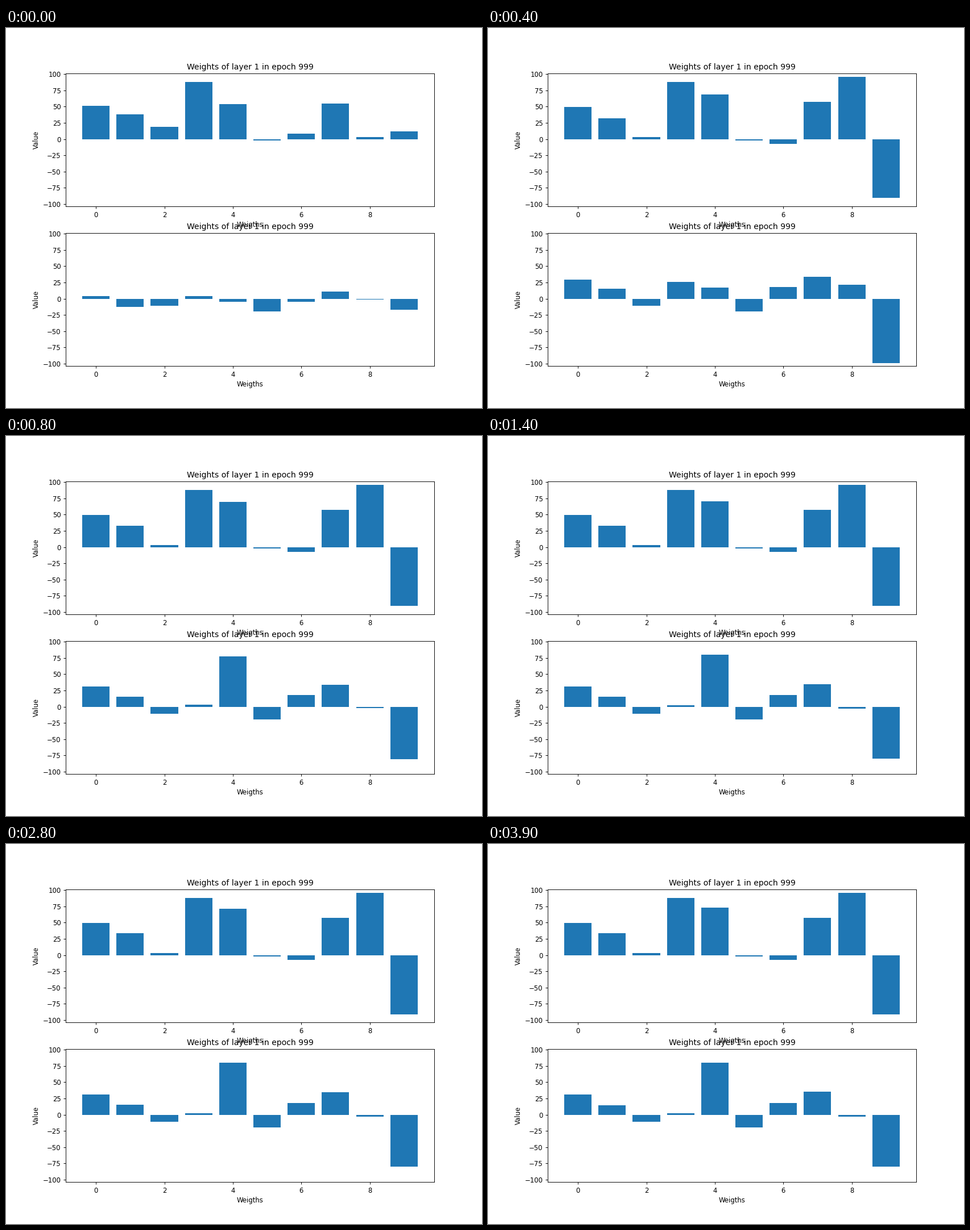
A matplotlib script for the animation above (5 s loop, 837 by 669 pixels).

```python
import numpy as np
import matplotlib.pyplot as plt
from matplotlib.animation import FuncAnimation

W, H, DPI = 837, 669, 83.7
TICKS, STEP_MS = 50, 100
BARS = 10


def weights(top, low):
    """Two layers of weights; bars left out are zero."""
    layers = np.zeros((2, BARS))
    for layer, values in zip(layers, (top, low)):
        for bar, value in values.items():
            layer[bar] = value
    return layers


def ramp(t, begin, end):
    return np.clip((t - begin) / (end - begin), 0, 1)


def settling(t):
    """Fast rise after tick 5 that levels off."""
    return 1 - np.exp(-0.5 * max(t - 5, 0) ** 1.7)


START = np.array([
    [51.2, 38.0, 18.8, 88.3, 53.9, -2.0, 8.2, 54.7, 2.9, 12.3],
    [3.7, -12.4, -10.8, 3.7, -5.1, -19.8, -4.4, 11.3, -1.2, -17.4],
])
lift = dict.fromkeys((3, 4, 6, 7, 8), 22.6)

# Each phase adds its weight changes, scaled by its progress over time.
PHASES = [
    (lambda t: t >= 1,
     weights({0: -1.7, 1: -5.7, 2: -15.9, 4: -1, 6: -15.6, 7: 3.1,
              8: 93.2, 9: -98.5},
             {**lift, 0: 25.5, 1: 27.7, 9: -79.4})),
    (lambda t: ramp(t, 1, 4),
     weights({4: 16.3, 9: -4.5}, {9: -2.2})),
    (settling,
     weights({}, {0: 1.7, 3: -24, 4: 62.8, 8: -24.3, 9: 18.9})),
    (lambda t: ramp(t, 5, 39),
     weights({1: 1.86, 4: 3.74, 9: -0.45}, {1: -0.44, 7: 1.2})),
]


def pose_at(t):
    return START + sum(progress(t) * change for progress, change in PHASES)


# The tiny excess keeps float rounding from losing a pixel.
fig, axes = plt.subplots(2, 1, dpi=DPI,
                         figsize=((W + 0.001) / DPI, (H + 0.001) / DPI))
groups = []
for ax, heights in zip(axes, START):
    groups.append(ax.bar(range(BARS), heights, color="#1f77b4"))
    ax.set_ylim(-104, 100.9)
    ax.set_yticks(range(-100, 101, 25))
    ax.set_title("Weights of layer 1 in epoch 999")
    ax.set_xlabel("Weigths")
    ax.set_ylabel("Value")


def update(tick):
    for group, heights in zip(groups, pose_at(tick)):
        for bar, height in zip(group, heights):
            bar.set_height(height)
    return [bar for group in groups for bar in group]


anim = FuncAnimation(fig, update, frames=TICKS, interval=STEP_MS,
                     repeat=True, repeat_delay=0, blit=False)
plt.show()
```
